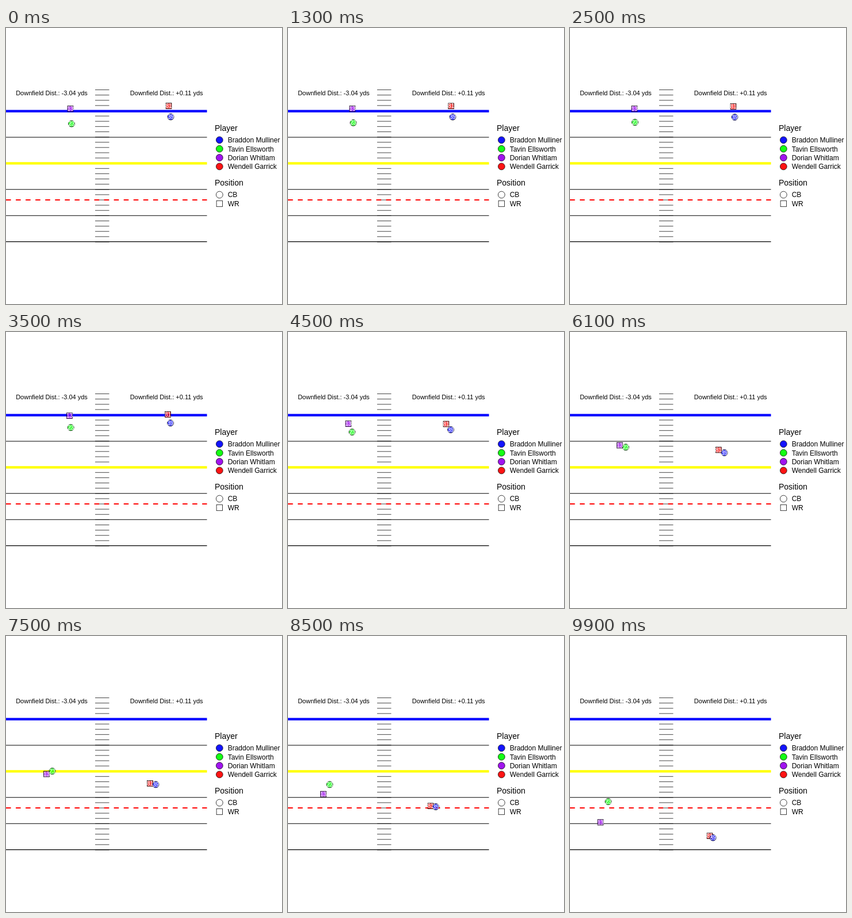
An HTML page that plays this animation: 480 by 480 pixels, repeating every 10 s.

```html
<!DOCTYPE html>
<html lang="en">
<head>
<meta charset="utf-8">
<title>Receiver routes</title>
<style>
  html, body { margin: 0; height: 100%; overflow: hidden; background: #fff; }
  svg { display: block; width: 100%; height: 100%; font-family: "Liberation Sans", Arial, sans-serif; }
  .num { font-size: 10px; fill: #fff; text-anchor: middle; }
  .dist { font-size: 11px; text-anchor: middle; }
  .title { font-size: 14px; }
  .label { font-size: 12px; }
</style>
</head>
<body>
<svg viewBox="0 0 480 480"></svg>
<script>
const svg = document.querySelector("svg");

function add(tag, attrs, text = "") {
  const el = document.createElementNS("http://www.w3.org/2000/svg", tag);
  for (const name in attrs) el.setAttribute(name, attrs[name]);
  el.textContent = text;
  svg.append(el);
  return el;
}

const write = (cls, x, y, text) => add("text", { class: cls, x, y }, text);

const line = (x1, x2, y, stroke, width, dash = "none") =>
  add("line", { x1, x2, y1: y, y2: y, stroke, "stroke-width": width, "stroke-dasharray": dash });

function marker(shape, x, y, r, fill, opacity) {
  const place = shape === "circle"
    ? { cx: x, cy: y, r }
    : { x: x - r, y: y - r, width: 2 * r, height: 2 * r };
  return add(shape, { ...place, fill, "fill-opacity": opacity, stroke: "#000", "stroke-width": 0.75 });
}

// Field
for (let i = 0; i < 30; i++) line(155, 179.5, 107.5 + 9.12 * i, "#444", 1);
for (const y of [190, 280.8, 326.2, 371.6]) line(0, 349.5, y, "#000", 1.1);
line(0, 349.5, 144.6, "#00f", 4.27);
line(0, 349.5, 235.4, "#ff0", 4.27);
line(0, 349.5, 299, "#f00", 2.13, "8.53");
write("dist", 79.5, 117, "Downfield Dist.: -3.04 yds");
write("dist", 279.2, 117, "Downfield Dist.: +0.11 yds");

// Legend
write("title", 363, 179, "Player");
[["#00f", "Braddon Mulliner"], ["#0f0", "Tavin Ellsworth"],
 ["#90e", "Dorian Whitlam"], ["#f00", "Wendell Garrick"]].forEach(([fill, name], i) => {
  const y = 194.8 + 15.35 * i;
  marker("circle", 371.3, y, 5.9, fill, 0.92);
  write("label", 385.7, y + 4.4, name);
});
write("title", 363, 274, "Position");
[["circle", 5.9, "CB"], ["rect", 5.2, "WR"]].forEach(([shape, r, name], i) => {
  const y = 290 + 15.5 * i;
  marker(shape, 371.3, y, r, "none", 1);
  write("label", 385.7, y + 4.4, name);
});

// Routes: positions at the given steps of 200 ms
const steps = [0, 13, 23, 31, 38, 43, 50];
const players = [
  { num: 13, shape: "rect", fill: "#90e",
    x: [112, 112, 105, 86.5, 70.5, 61.5, 53], y: [140.5, 140.5, 159.5, 197, 240, 275, 324] },
  { num: 23, shape: "circle", fill: "#0f0",
    x: [114, 113, 111.5, 97, 80.5, 72.5, 66.5], y: [166.5, 164, 174, 200.3, 235, 258.3, 288] },
  { num: 81, shape: "rect", fill: "#f00",
    x: [283, 284, 275, 258.3, 250.5, 248, 243], y: [135.5, 136.5, 160, 205, 256.3, 295.7, 347.7] },
  { num: 39, shape: "circle", fill: "#00f",
    x: [286.5, 286.5, 283, 268.5, 260.5, 257, 248.7], y: [154.5, 155, 170, 210, 258.3, 297, 350.7] },
];
for (const p of players) p.mark = marker(p.shape, 0, 0, p.shape === "rect" ? 4.9 : 5.5, p.fill, 0.7);
for (const p of players) p.text = write("num", 0, 3.6, p.num);

const slope = (v, i) => (v[i + 1] - v[i]) / (steps[i + 1] - steps[i]);

// Parabolic tangent, limited so that the curve never overshoots
function tangent(v, i) {
  if (i === 0) return slope(v, 0);
  if (i === steps.length - 1) return slope(v, i - 1);
  const a = slope(v, i - 1), b = slope(v, i);
  if (a * b <= 0) return 0;
  const before = steps[i] - steps[i - 1], after = steps[i + 1] - steps[i];
  const m = (a * after + b * before) / (before + after);
  return Math.sign(m) * Math.min(Math.abs(m), 3 * Math.abs(a), 3 * Math.abs(b));
}

function at(v, step) {
  let i = 0;
  while (i < steps.length - 2 && step >= steps[i + 1]) i++;
  const h = steps[i + 1] - steps[i], u = (step - steps[i]) / h, w = 1 - u;
  return v[i] * w * w * (1 + 2 * u) + v[i + 1] * u * u * (3 - 2 * u)
    + h * u * w * (tangent(v, i) * w - tangent(v, i + 1) * u);
}

function draw(now) {
  const step = Math.floor((now % 10000 + 100) / 200);
  for (const p of players) {
    const move = `translate(${at(p.x, step)} ${at(p.y, step)})`;
    p.mark.setAttribute("transform", move);
    p.text.setAttribute("transform", move);
  }
}

const start = performance.now();
function tick() {
  draw(performance.now() - start);
  requestAnimationFrame(tick);
}
tick();
</script>
</body>
</html>
```
